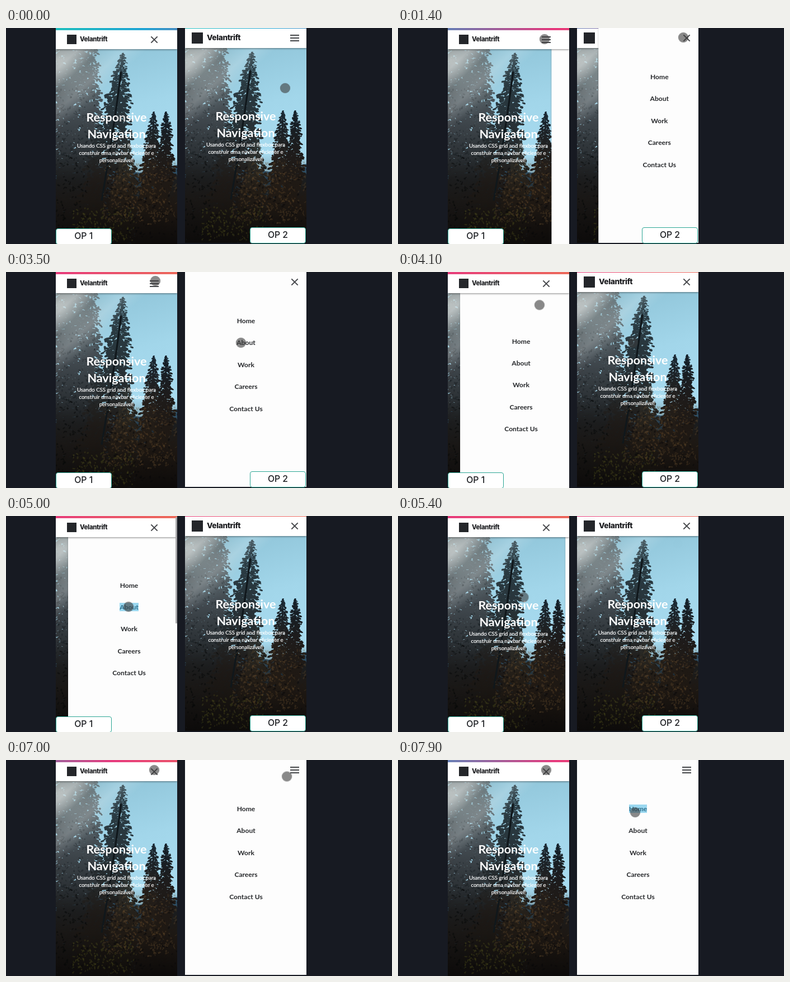
These frames come from a looping animation (690 px wide and 388 px high, 8 s). An HTML page with a canvas:

```html
<!DOCTYPE html>
<html lang="en">
<head>
<meta charset="utf-8">
<title>Responsive navigation, two options</title>
<style>
  html, body { margin: 0; width: 100%; height: 100%; overflow: hidden; background: #171a22; }
  .stage { position: relative; width: 690px; height: 388px; overflow: hidden; background: #171a22; font-family: Lato, sans-serif; }
  .stage * { box-sizing: border-box; }
  .stage div, .stage canvas, .stage i { position: absolute; }
  .anim { animation: 8s linear infinite; }

  .phone { top: 0; width: 217px; overflow: hidden; background: #fff; }
  .one { left: 89px; height: 388px; --dy: 0px; }
  .two { left: 320px; height: 386px; --dy: -2.5px; }

  canvas { left: 0; width: 217px; height: 350px; }
  .one canvas { top: 38px; }
  .two canvas { top: 36px; }

  .hero { left: 0; top: var(--dy); width: 217px; text-align: center; color: #fff; white-space: nowrap; }
  .hero div { left: 0; width: 100%; }
  .big { top: 145px; font: 700 21.5px/30px Lato, sans-serif; }
  .small { top: 205px; font: 400 9.55px/13.2px Lato, sans-serif; -webkit-text-stroke: .2px #fff; }

  .bar { left: 0; top: 0; width: 217px; background: #fff; box-shadow: 0 1px 3px #0007; }
  .one .bar { height: 38px; }
  .two .bar { height: 36px; }
  .mark { background: #24262a; }
  .one .mark { left: 20px; top: 12px; width: 17px; height: 17px; }
  .two .mark { left: 12px; top: 8px; width: 20px; height: 20px; }
  .brand { color: #1c1d20; font: 800 11.3px/20px Inter, sans-serif; letter-spacing: -.03em; }
  .one .brand { left: 43px; top: 10px; }
  .two .brand { left: 39px; top: 7px; font-size: 13.8px; }

  .strip { left: 0; top: 0; width: 217px; height: 4px; background: linear-gradient(90deg, #23d5ab, #23a6d5 33%, #e73c7e 67%, #ee7752) 20% 0 / 400% 100%; animation-name: hue; }
  .two .strip { height: 1px; }

  .panel { top: 0; height: 388px; background: #fdfdfd; box-shadow: 0 0 3px #0004; }
  .one .panel { left: 22px; width: 195px; animation-name: slideOne; }
  .two .panel { left: 0; width: 217px; animation-name: slideTwo; }
  .panel div { left: 0; width: 218px; text-align: center; font: 700 12.1px/15px Lato, sans-serif; color: #26282b; }
  .panel span { display: inline-block; }
  .tap { animation: tap 8s step-end infinite; animation-delay: calc(var(--at) - 8s); }

  .icon { width: 16px; height: 14px; }
  .one .icon { left: 168px; top: 14px; }
  .two .icon { left: 187.5px; top: 11px; }
  .icon i { left: 0; width: 16px; height: 2.2px; background: #45474a; }
  .menu i:nth-child(1) { top: 1px; }
  .menu i:nth-child(2) { top: 6px; }
  .menu i:nth-child(3) { top: 11px; }
  .close i { top: 6px; height: 2px; transform: rotate(45deg); }
  .close i + i { transform: rotate(-45deg); }
  .icon { animation-timing-function: step-end; }
  .one .menu { animation-name: menuOne; }
  .one .close { animation-name: closeOne; }
  .two .menu { animation-name: menuTwo; }
  .two .close { animation-name: closeTwo; }

  .scroll { left: 214px; width: 2.5px; height: 191px; border-radius: 1px; background: #a8a8aa; animation-name: scroll; animation-timing-function: step-end; }

  .cursor { left: -9px; top: -9px; width: 18px; height: 18px; border-radius: 50%; background: #3a3a3a98; box-shadow: 0 0 1px #3a3a3a80; animation-timing-function: ease-in-out; }
  .c1 { animation-name: moveOne; }
  .c2 { animation-name: moveTwo; }

  .label { background: #fff; border: 1.5px solid #2aa593; border-radius: 4px; color: #1c1e22; text-align: center; font: 500 15.8px/26px Inter, sans-serif; animation-name: label; animation-timing-function: step-end; }
  .l1 { left: 89px; top: 360px; width: 99.5px; height: 29px; }
  .l2 { left: 436px; top: 358px; width: 100px; height: 29px; }

  @keyframes hue {
    0% { background-position: 20% 0; }
    17.5% { background-position: 60% 0; }
    28.75% { background-position: 80% 0; }
    43.75% { background-position: 90% 0; }
    62.5% { background-position: 92% 0; }
    77.5% { background-position: 86% 0; }
    98.75%, 100% { background-position: 60% 0; }
  }
  @keyframes slideOne {
    0%, 16.5% { transform: translateX(199px); animation-timing-function: ease; }
    23.4%, 28.5% { transform: none; animation-timing-function: ease; }
    35.4%, 44.5% { transform: translateX(199px); animation-timing-function: ease; }
    51.4%, 62.6% { transform: none; animation-timing-function: ease; }
    69.5%, 100% { transform: translateX(199px); }
  }
  @keyframes slideTwo {
    0%, 14.2% { transform: translateX(221px); animation-timing-function: ease; }
    20.5%, 45% { transform: none; animation-timing-function: ease; }
    51.3%, 79.4% { transform: translateX(221px); animation-timing-function: ease; }
    85.6%, 100% { transform: none; }
  }
  @keyframes menuOne { 0%, 44.4%, 100% { opacity: 0; } 16.3% { opacity: 1; } }
  @keyframes closeOne { 0%, 44.4%, 100% { opacity: 1; } 16.3% { opacity: 0; } }
  @keyframes menuTwo { 0%, 79.3%, 100% { opacity: 1; } 14% { opacity: 0; } }
  @keyframes closeTwo { 0%, 79.3%, 100% { opacity: 0; } 14% { opacity: 1; } }
  @keyframes tap { 0% { background: #9bd8f0; color: #2f6f8c; } 2.5%, 100% { background: none; color: inherit; } }
  @keyframes scroll {
    0%, 31.5%, 65%, 100% { opacity: 0; top: 0; }
    25% { opacity: 1; top: 187px; }
    55% { opacity: 1; top: 2px; }
  }
  @keyframes moveOne {
    0% { transform: translate(207px, 160px); opacity: .35; }
    3.5% { transform: translate(207px, 160px); opacity: 0; }
    8% { transform: translate(215px, 140px); opacity: 0; }
    15%, 19.5% { transform: translate(262px, 20px); opacity: 1; }
    27.8%, 32% { transform: translate(213px, 125px); opacity: 1; }
    43%, 46% { transform: translate(267px, 16px); opacity: 1; }
    60%, 65% { transform: translate(219px, 163px); opacity: 1; }
    75.5%, 100% { transform: translate(265px, 18px); opacity: 1; }
  }
  @keyframes moveTwo {
    0% { transform: translate(499px, 108px); opacity: 1; }
    12%, 34% { transform: translate(510px, 17px); opacity: 1; }
    43%, 50% { transform: translate(420px, 127px); opacity: 1; }
    55% { transform: translate(420px, 127px); opacity: 0; }
    67% { transform: translate(500px, 50px); opacity: 0; }
    75.5%, 84% { transform: translate(516px, 18px); opacity: 1; }
    97%, 100% { transform: translate(424px, 94px); opacity: 1; }
  }
  @keyframes label { 0% { opacity: 1; } 70%, 100% { opacity: 0; } }
</style>
</head>
<body>
<div class="stage">
  <div class="phone one">
    <canvas width="217" height="350"></canvas>
    <div class="hero">
      <div class="big">Responsive<br>Navigation</div>
      <div class="small">Usando CSS grid and flexbox para<br>construir uma navbar eficiente e<br>personalizável!</div>
    </div>
    <div class="panel anim" data-top="116.5" data-taps="2.26 4.92"></div>
    <div class="bar"><div class="mark"></div><div class="brand">Velantrift</div></div>
    <div class="strip anim"></div>
    <div class="icon menu anim"><i></i><i></i><i></i></div>
    <div class="icon close anim"><i></i><i></i></div>
    <div class="scroll anim"></div>
  </div>
  <div class="phone two">
    <canvas width="217" height="350"></canvas>
    <div class="hero">
      <div class="big">Responsive<br>Navigation</div>
      <div class="small">Usando CSS grid and flexbox para<br>construir uma navbar eficiente e<br>personalizável!</div>
    </div>
    <div class="bar"><div class="mark"></div><div class="brand">Velantrift</div></div>
    <div class="strip anim"></div>
    <div class="panel anim" data-top="80" data-taps="7.84 3.58"></div>
    <div class="icon menu anim"><i></i><i></i><i></i></div>
    <div class="icon close anim"><i></i><i></i></div>
  </div>
  <div class="label l1 anim">OP 1</div>
  <div class="label l2 anim">OP 2</div>
  <div class="cursor c1 anim"></div>
  <div class="cursor c2 anim"></div>
</div>
<script>
  const links = ['Home', 'About', 'Work', 'Careers', 'Contact Us'];
  for (const panel of document.querySelectorAll('.panel')) {
    const taps = panel.dataset.taps.split(' ');
    panel.innerHTML = links.map((name, i) => {
      const tap = taps[i] ? ` class="tap" style="--at:${taps[i]}s"` : '';
      return `<div style="top:${+panel.dataset.top + i * 39.4}px"><span${tap}>${name}</span></div>`;
    }).join('');
  }

  function paintForest(ctx) {
    let seed = 11;
    const rand = () => (seed = seed * 16807 % 2147483647) / 2147483647;

    const addStops = (g, stops) => {
      stops.forEach((c, i) => g.addColorStop(i / (stops.length - 1), c));
      return g;
    };
    const fade = (x0, y0, x1, y1, ...stops) => addStops(ctx.createLinearGradient(x0, y0, x1, y1), stops);
    const glow = (x, y, r, ...stops) => addStops(ctx.createRadialGradient(x, y, 0, x, y, r), stops);
    const fillAll = style => { ctx.fillStyle = style; ctx.fillRect(0, 0, 217, 350); };

    function tuft(x, y, size, angle) {
      ctx.beginPath();
      ctx.ellipse(x, y, size * (1.2 + rand() * 2), size * (.7 + rand()), angle, 0, 7);
      ctx.fill();
    }

    // Conifer of scattered tufts, leaning from its tip (x0, y0) to its foot (x1, y1)
    function tree(x0, y0, x1, y1, width, density, ...colors) {
      ctx.fillStyle = ctx.strokeStyle = fade(0, Math.max(y0, 0), 0, y1, ...colors);
      ctx.lineWidth = 2.5;
      ctx.beginPath();
      ctx.moveTo(x0, y0);
      ctx.lineTo(x1, y1);
      ctx.stroke();
      for (let y = y0; y < y1; y += 3) {
        const u = (y - y0) / (y1 - y0), x = x0 + (x1 - x0) * u;
        const half = 1 + width * u ** .6;
        for (const dir of [-1, 1]) {
          const reach = half * (.55 + .55 * rand());
          for (let n = 1 + half * density / 2; n > 0; n--) {
            const out = reach * rand();
            tuft(x + dir * out, y + out * .15 + rand() * 3, .7 + Math.min(half, 25) / 32, dir * .35);
          }
        }
      }
    }

    function dabs(count, x, y, w, h, color) {
      ctx.fillStyle = color;
      while (count--) tuft(x + rand() * w, y + rand() * h, 1, rand() * 3);
    }

    fillAll(fade(60, 0, 120, 230, '#8fc4d8', '#a2d6ea', '#a9dcf1'));

    // Far ridge
    ctx.fillStyle = fade(0, 205, 0, 265, '#3f7295', '#1d3140');
    ctx.beginPath();
    ctx.moveTo(0, 350); ctx.lineTo(0, 200); ctx.lineTo(150, 222);
    ctx.lineTo(217, 208); ctx.lineTo(217, 350);
    ctx.fill();

    tree(66, -60, 58, 350, 34, .4, '#5b6a70', '#40494f', '#1d2123', '#0e0f10');
    tree(8, -150, 10, 350, 48, .55, '#63696c', '#43494e', '#1d2023', '#0c0c0d');
    tree(40, -130, 36, 350, 52, .5, '#5f696d', '#434b51', '#1e2225', '#0d0d0e');
    tree(120, 7, 76, 350, 56, .5, '#2b4049', '#28343a', '#211e1c', '#12100d');
    tree(128, 165, 122, 350, 40, .55, '#2c3333', '#2c241a', '#15120d');
    tree(175, 113, 166, 350, 32, 1, '#172530', '#231f1c', '#2b2117', '#100d0b');
    tree(197, 112, 194, 350, 29, 1, '#131f29', '#1e1b1a', '#261d15', '#0d0b0a');
    tree(216, 228, 214, 350, 28, .9, '#1a2229', '#261d15', '#0d0b0a');
    fillAll(fade(0, 190, 0, 350, '#17131000', '#1a1511a0', '#0c0a09d0'));

    // Main trunk
    ctx.strokeStyle = '#10171b';
    ctx.lineWidth = 3;
    ctx.beginPath();
    ctx.moveTo(117, 40); ctx.quadraticCurveTo(104, 140, 82, 272);
    ctx.stroke();

    dabs(130, 0, 70, 70, 150, '#0d131750');
    dabs(260, 85, 200, 130, 115, '#6b503048');
    dabs(140, 100, 220, 100, 90, '#94683830');
    dabs(170, 30, 285, 110, 60, '#57561f50');
    dabs(120, 90, 210, 127, 130, '#08080980');
    dabs(90, 0, 190, 60, 150, '#06070880');

    // Sun haze and slanted beams
    fillAll(glow(4, 20, 110, '#d5dfdca0', '#a9babc48', '#a9c4ca00'));
    fillAll(fade(0, 0, 75, 82, '#fff0', '#ffffff50', '#fff0', '#ffffff2c', '#fff0'));
  }

  document.querySelectorAll('canvas').forEach(c => paintForest(c.getContext('2d')));
</script>
</body>
</html>
```
